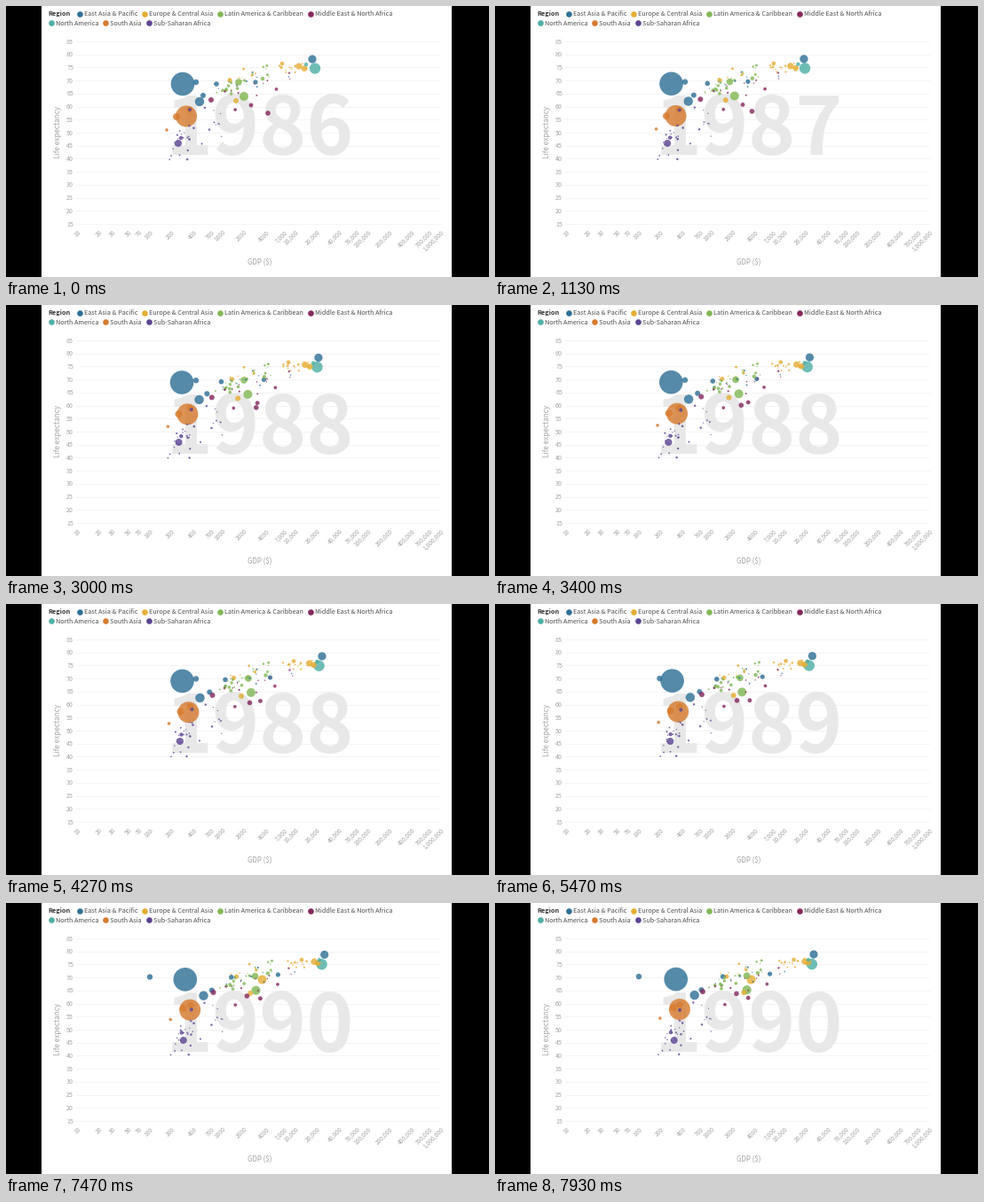
A matplotlib script for the animation above (8 s loop, 544 by 306 pixels).

```python
import numpy as np
import matplotlib.pyplot as plt
from matplotlib.animation import FuncAnimation
from matplotlib.colors import to_rgba
from matplotlib.patches import Rectangle

W, H = 544, 306
FRAMES, STEP = 125, 64
MOVE, STARTS = 800, (730, 2870, 5000, 7130)
FIRST_YEAR = 1986

plt.rcParams["font.family"] = ["Noto Sans CJK JP", "DejaVu Sans"]

BLUE, YELLOW, GREEN, PLUM = "#2f7096", "#e6ae34", "#82b955", "#86295f"
TEAL, ORANGE, VIOLET = "#4fb0a6", "#d67c30", "#5c4592"

rng = np.random.default_rng(12)
years = np.arange(5)
bubbles = []  # (radius, colour, x per year, y per year)


def country(colour, r, start, end, bend=0):
    """A bubble going from start to end, its path bowed sideways by bend."""
    k = years / 4
    x = start[0] + (end[0] - start[0]) * k + bend * 4 * k * (1 - k)
    y = start[1] + (end[1] - start[1]) * k
    bubbles.append((r, colour, x, y))


def cluster(colour, count, start, end, spread, drift, r_max):
    """Small countries scattered around a line, wandering a little each year."""
    for k in rng.random(count):
        x = start[0] + k * (end[0] - start[0]) + drift * years
        y = start[1] + k * (end[1] - start[1]) + rng.normal(0, spread)
        r = 0.6 + (r_max - 0.6) * rng.random() ** 2
        bubbles.append((r, colour, x + rng.normal(0, 1.5, 5), y - 0.6 * years))


country(BLUE, 13.3, (199, 88), (204, 86), bend=-3)
country(BLUE, 5.2, (218, 108), (225, 104), bend=-3)
country(BLUE, 3, (222, 101), (232.5, 98), bend=2)
country(BLUE, 2.8, (237, 88), (257, 83))
country(BLUE, 4.6, (345, 60), (359, 58), bend=4)
country(BLUE, 2.6, (281, 86), (310, 80), bend=2)
country(YELLOW, 3.6, (330, 68), (349, 66), bend=2)
country(YELLOW, 3.4, (336, 70.5), (353, 67), bend=2)
country(YELLOW, 2.3, (311, 65), (337, 64))
country(YELLOW, 3, (259, 107), (281, 101), bend=-5)
country(YELLOW, 2.6, (252, 84), (261, 83))
country(GREEN, 5, (268, 102), (284, 98))
country(GREEN, 3.8, (262, 86), (284, 82))
country(GREEN, 2.2, (289, 82), (296, 79))
country(PLUM, 3, (231, 106), (234, 100))
country(PLUM, 2.8, (295, 121), (272, 102), bend=-9)
country(PLUM, 2.4, (276, 112), (285, 107), bend=6)
country(TEAL, 6.2, (348, 70.5), (357, 69))
country(TEAL, 2.2, (338, 66), (353, 64), bend=5)
country(ORANGE, 12, (203, 124.5), (208, 120))
country(ORANGE, 4, (192, 125), (201, 118))
country(ORANGE, 3.6, (207, 117), (208, 115))
country(ORANGE, 1.8, (181, 140), (186, 130))
country(VIOLET, 4, (194, 155), (202, 155), bend=-2)
country(VIOLET, 2.2, (197, 149), (198, 146))
country(VIOLET, 2, (207, 117), (208, 121), bend=2)

# Two late jumps: one falls back sharply, one only joins the chart.
late = years >= 3
bubbles.append((3.2, BLUE, np.where(late, 162, 214), 86 - 0.75 * years))
bubbles.append((5, YELLOW, np.full(5, 288.5), np.full(5, 86.5)))
NEWCOMER_R = 5

cluster(GREEN, 22, (236, 99), (298, 74), 5, 1.5, 2)
cluster(YELLOW, 12, (306, 73), (338, 66), 3, 3.5, 1.5)
cluster(YELLOW, 6, (246, 84), (290, 76), 4, 1, 1.6)
cluster(BLUE, 8, (230, 100), (330, 70), 6, 2, 1.2)
cluster(PLUM, 12, (238, 106), (320, 84), 7, 0.5, 2)
cluster(VIOLET, 22, (184, 160), (244, 126), 10, 0.5, 1.7)
cluster(VIOLET, 10, (188, 160), (214, 140), 6, 0.5, 1.7)

bubbles.sort(key=lambda b: -b[0])
xs = np.array([b[2] for b in bubbles], float)
ys = np.array([b[3] for b in bubbles], float)
sizes = np.array([(2 * b[0]) ** 2 for b in bubbles])
newcomer = np.array([b[0] == NEWCOMER_R and b[1] == YELLOW for b in bubbles])

fig = plt.figure(figsize=(W / 72, H / 72), dpi=72, facecolor="black")
ax = fig.add_axes([0, 0, 1, 1])
ax.set(xlim=(0, W), ylim=(H, 0))
ax.axis("off")
ax.add_patch(Rectangle((40, 0), 461.5, H, fc="white", lw=0, zorder=0))


def label(x, y, s, size, colour="#a6a6a6", **kw):
    return ax.text(x, y, s, fontsize=size, color=colour, **kw)


def legend_item(x, y, name, colour):
    ax.scatter(x, y - 2.7, s=44, color=colour, lw=0)
    label(x + 5, y, name, 7.25, "#505050")


label(47, 11.2, "Region", 7.3, "#383838", weight="bold")
legend_item(83, 11.2, "East Asia & Pacific", BLUE)
legend_item(156, 11.2, "Europe & Central Asia", YELLOW)
legend_item(241, 11.2, "Latin America & Caribbean", GREEN)
legend_item(343, 11.2, "Middle East & North Africa", PLUM)
legend_item(51, 21.5, "North America", TEAL)
legend_item(112, 21.5, "South Asia", ORANGE)
legend_item(160.5, 21.5, "Sub-Saharan Africa", VIOLET)

for age in range(15, 90, 5):
    y = 40 + (85 - age) * 2.943
    ax.plot([79, 489], [y, y], color="#f2f2f2", lw=0.8, zorder=1)
    label(76, y + 2.6, str(age), 7.1, ha="right")

for power in range(1, 7):
    for lead in (1, 2, 3, 5, 7) if power == 1 else (1, 2, 4, 7):
        value = lead * 10 ** power
        if value > 1e6:
            break
        x = 81 + 81.75 * (np.log10(value) - 1)
        text = f"{value:,}" if value >= 7000 else str(value)
        label(x + 1.5, 253.8, text, 6.6, rotation=45, ha="right",
              va="center_baseline", rotation_mode="anchor")

label(61, 142.3, "Life expectancy", 8.2, rotation=90,
      ha="center", va="baseline", rotation_mode="anchor")
label(285.5, 292, "GDP ($)", 7.9, ha="center")

year = label(286, 168.3, "", 90, "#e8e8e8", weight="bold", ha="center",
             zorder=2)
dots = ax.scatter(xs[:, 0], ys[:, 0], s=sizes, lw=0,
                  c=[to_rgba(b[1], 0.82) for b in bubbles], zorder=3)


def draw(i):
    t = i * STEP
    pos = sum(np.clip((t - s) / MOVE, 0, 1) for s in STARTS)
    k = min(int(pos), 3)
    f = pos - k
    dots.set_offsets(np.column_stack((xs[:, k] * (1 - f) + xs[:, k + 1] * f,
                                      ys[:, k] * (1 - f) + ys[:, k + 1] * f)))
    dots.set_sizes(np.where(newcomer & (pos < 3), 0, sizes))
    year.set_text(str(FIRST_YEAR + sum(t >= s for s in STARTS)))
    return dots, year


anim = FuncAnimation(fig, draw, frames=FRAMES, interval=STEP, repeat=True,
                     repeat_delay=0, blit=False)
plt.show()
```
